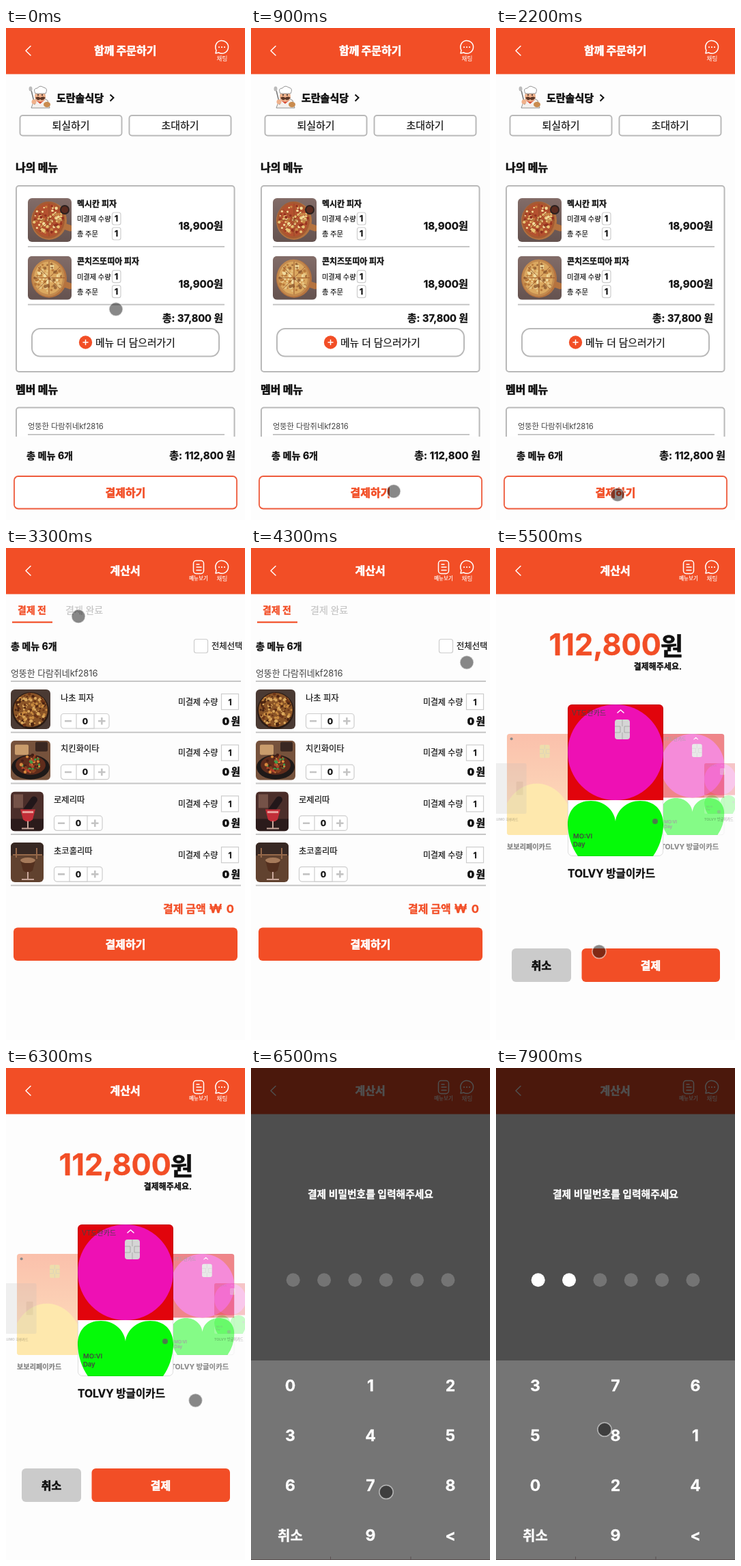
An HTML page for the animation above (8000 ms loop, 350x720 px).

```html
<!DOCTYPE html>
<html lang="ko">
<head>
<meta charset="utf-8">
<title>함께 주문하기</title>
<style>
html, body { margin: 0; width: 100%; height: 100%; overflow: hidden; background: #fdfdfd; }
svg { display: block; width: 350px; height: 720px; }
text { font-family: Inter, "Noto Sans CJK KR", "Noto Sans CJK", sans-serif; font-weight: 400; color: #111; fill: currentColor; stroke-linejoin: round; white-space: pre; }
.d { font-weight: 500; stroke: currentColor; stroke-width: .2; }
.b { font-weight: 700; stroke: currentColor; stroke-width: .3; }
.k { font-weight: 900; stroke: currentColor; stroke-width: .6; }
.m { text-anchor: middle; } .e { text-anchor: end; }
.w { color: #fff; } .o { color: #f24e26; } .g { color: #c4c4c4; } .n { color: #444; }
.line { fill: none; stroke: #c6c6c6; stroke-width: 2; }
.box { fill: #fff; stroke: #b9b9b9; stroke-width: 2; }
.thin { fill: #fff; stroke: #cdcdcd; stroke-width: 1.2; }
.icon { fill: none; stroke: #fff; stroke-width: 1.5; stroke-linecap: round; stroke-linejoin: round; }

/* Everything shares one 8 s clock */
.bill, .checked, .cards, .pin, .one, .two, .cursor { animation: 8s step-end -10ms infinite; }
.bill { animation-name: bill; } .checked { animation-name: checked; }
.cards { animation-name: cards; } .pin { animation-name: pin; }
.one { animation-name: one; } .two { animation-name: two; }
@keyframes bill { 0% { opacity: 0 } 32.5%, to { opacity: 1 } }
@keyframes checked { 0% { opacity: 0 } 58.75%, to { opacity: 1 } }
@keyframes cards { 0% { opacity: 0 } 66.25%, to { opacity: 1 } }
@keyframes pin { 0% { opacity: 0 } 81.25%, to { opacity: 1 } }
@keyframes one { 0% { opacity: 0 } 92.5%, to { opacity: 1 } }
@keyframes two { 0% { opacity: 0 } 97.5%, to { opacity: 1 } }

.cursor { animation-name: cursor; fill: #0007; stroke: #fff8; stroke-width: 1.5; }
@keyframes cursor {
  0% { translate: 161px 411.5px; animation-timing-function: steps(2) }
  2.5% { translate: 70px 300px }
  3.75% { translate: 26px 205px; animation-timing-function: steps(3) }
  7.5% { translate: 332px 27px; animation-timing-function: steps(2) }
  10% { translate: 300px 430px }
  11.25% { translate: 209px 678px }
  12.5% { translate: 187px 650px }
  13.75% { translate: 196px 622px }
  25% { translate: 185px 640px }
  26.25% { translate: 171px 675px }
  27.5%, 32.5% { translate: 178px 683px; animation-timing-function: step-end }
  33.75% { translate: 180px 640px; animation-timing-function: steps(3) }
  37.5% { translate: 220px 330px; animation-timing-function: steps(3) }
  41.25% { translate: 106px 100px }
  42.5% { translate: 94px 102px }
  43.75% { translate: 115px 95px }
  45% { translate: 134px 92px }
  47.5% { translate: 100px 110px }
  48.75% { translate: 55px 160px }
  50% { translate: 16px 270px }
  51.25% { translate: 150px 486px }
  52.5% { translate: 336px 380px }
  53.75% { translate: 316px 167.5px; animation-timing-function: steps(2) }
  56.25% { translate: 287px 146px }
  57.5% { translate: 285px 144px; animation-timing-function: steps(4) }
  62.5% { translate: 230px 400px; animation-timing-function: steps(2) }
  65% { translate: 165px 580px; animation-timing-function: steps(3) }
  68.75% { translate: 151px 590.5px; animation-timing-function: steps(2) }
  71.25% { translate: 175px 300px }
  72.5% { translate: 170px 137px; animation-timing-function: steps(2) }
  75% { translate: 24px 345px; animation-timing-function: steps(2) }
  77.5% { translate: 340px 345px; animation-timing-function: steps(2) }
  80% { translate: 215px 628px }
  81.25% { translate: 198px 620.5px; animation-timing-function: steps(6) }
  88.75% { translate: 180px 706px }
  91.25% { translate: 178px 692px }
  92.5% { translate: 175px 684px; animation-timing-function: steps(3) }
  96.25% { translate: 170px 550px }
  97.5% { translate: 165px 537px }
  98.75%, to { translate: 159px 529px }
}
</style>
</head>
<body>
<svg id="stage" viewBox="0 0 350 720"></svg>
<script>
const ORANGE = '#f24e26';
const text = (x, y, size, str, cls = '') => `<text x="${x}" y="${y}" font-size="${size}" class="${cls}">${str}</text>`;
const rect = (x, y, w, h, r, attrs) => `<rect x="${x}" y="${y}" width="${w}" height="${h}" rx="${r}" ${attrs}/>`;
const disc = (x, y, r, fill) => `<circle cx="${x}" cy="${y}" r="${r}" fill="${fill}"/>`;
const oval = (x, y, rx, ry, fill) => `<ellipse cx="${x}" cy="${y}" rx="${rx}" ry="${ry}" fill="${fill}"/>`;
const path = (d, attrs) => `<path d="${d}" ${attrs}/>`;
const group = (cls, body) => `<g class="${cls}">${body}</g>`;
const at = (x, y, body, scale = 1, attrs = '') => `<g transform="translate(${x} ${y}) scale(${scale})" ${attrs}>${body}</g>`;
const rule = (x1, x2, y) => path(`M${x1} ${y}H${x2}`, 'class="line"');

// Seeded scatter of toppings inside a disc
function specks(n, seed, cx, cy, r, colors) {
  const rand = () => (seed = (seed * 16807) % 2147483647) / 2147483647;
  let out = '';
  for (let i = 0; i < n; i++) {
    const a = rand() * 6.283, d = Math.sqrt(rand()) * r;
    out += disc((cx + d * Math.cos(a)).toFixed(1), (cy + d * Math.sin(a)).toFixed(1), (1 + rand() * 1.5).toFixed(1), colors[i % colors.length]);
  }
  return out;
}

const photo = (x, y, w, h, body) => at(x, y, body, 1, `clip-path="url(#clip${w})"`);
const slices = path('M31 8V56M8 32H54M15 16L47 48M47 16L15 48', 'stroke="#8d4a24" stroke-width=".8"');
const pizza = (crust, sauce, colors, seed) => rect(0, 0, 64, 64, 0, 'fill="url(#table)"')
  + path('M44 38L62 44', 'stroke="#b5733f" stroke-width="9" stroke-linecap="round"')
  + oval(31, 33, 26, 28, '#b5733f') + oval(30, 32, 24, 27, crust) + oval(30, 32, 21, 24, sauce)
  + specks(90, seed, 30, 32, 21, colors) + slices;
const mexican = pizza('#a65a32', '#b4512f', ['#f3dd9a', '#93301f', '#e8c476', '#c98745'], 11)
  + disc(54, 17, 7, '#2c211f') + disc(54, 17, 5, '#5a2b20');
const corn = pizza('#c38a4e', '#dba860', ['#f1dca0', '#b97a3c', '#e6c481', '#9c6a3a'], 23);
const nacho = rect(0, 0, 58, 58, 0, 'fill="#4a3a33"') + disc(29, 31, 27, '#2b1b14') + disc(29, 30, 25, '#8a5427')
  + specks(130, 7, 29, 30, 24, ['#c98b40', '#4b2412', '#dba85c', '#6e3517']);
const fajita = rect(0, 0, 58, 58, 0, 'fill="#76523c"') + rect(6, 6, 20, 15, 2, 'fill="#c99c6c"') + rect(36, 2, 18, 14, 2, 'fill="#3a2721"')
  + oval(29, 39, 28, 18, '#1e1918') + oval(29, 36, 22, 14, '#5f2c1c')
  + specks(60, 19, 29, 35, 14, ['#b2432a', '#3f9a49', '#82401f', '#d9883c', '#431f16']);
const glass = color => path('M14 26H36L32 41Q25 47 18 41Z', `fill="${color}"`)
  + path('M25 43V53M16 54H34', 'stroke="#c9a79b" stroke-width="2"');
const rose = rect(0, 0, 48, 58, 0, 'fill="#4b2e2a"') + rect(0, 40, 48, 18, 0, 'fill="#2b1b1b"')
  + rect(4, 4, 14, 20, 0, 'fill="#755248"') + path('M22 29L34 12', 'stroke="#22171a" stroke-width="10" stroke-linecap="round"')
  + glass('#c22e38') + path('M17 30H33', 'stroke="#e8a09b" stroke-width="3"');
const choco = rect(0, 0, 48, 58, 0, 'fill="#61422f"') + rect(0, 0, 48, 19, 0, 'fill="#372823"')
  + path('M3 18H46M8 8V22M38 8V24', 'stroke="#96694a" stroke-width="2"')
  + glass('#54301f') + oval(25, 26, 11, 4, '#a67a5a');

const chef = path('M41 106Q50 98 61 106L64 117H37Z', 'fill="#f4f1ee" stroke="#777" stroke-width=".8"')
  + path('M44 106L50 111L57 105Z', 'fill="#d84a35"') + disc(50, 100, 8, '#efb18b')
  + path('M43 102Q47 99 50 102Q54 99 58 102Q53 108 50 104Q47 108 43 102Z', 'fill="#5d3828"')
  + path('M43 96Q39 88 46 88Q50 83 55 87Q62 88 58 96Z', 'fill="#fff" stroke="#888" stroke-width=".9"')
  + disc(47, 98, 1, '#222') + disc(53, 98, 1, '#222')
  + path('M37 91L42 112', 'stroke="#777" stroke-width="1.5"') + oval(36, 89, 2.5, 3.5, '#bbb')
  + disc(41, 108, 3.5, '#efb18b') + oval(60, 112, 5, 4, '#c98b4e');

const bubble = path('M308 32.5A9.4 9.4 0 1 1 311.5 36L307 37Z', 'class="icon"')
  + [312, 316, 320].map(x => disc(x, 28, 1.1, '#fff')).join('') + text(316.5, 48, 8.6, '채팅', 'w m');
const header = title => rect(0, 0, 350, 67.5, 0, `fill="${ORANGE}"`) + path('M36 26.5L29 33.3L36 40', 'class="icon"')
  + text(174.7, 39, 16, title, 'w k m') + bubble;
const menuIcon = rect(274.5, 18.5, 15, 19, 4, 'class="icon"') + path('M279 24H283M279 28H286M279 32.5H286', 'class="icon"')
  + text(282, 47, 7.5, '메뉴보기', 'w d m');
const paper = rect(0, 0, 350, 720, 0, 'fill="#fdfdfd"');

const count = y => rect(155.5, y, 12.5, 18, 3, 'class="thin"') + text(161.7, y + 13.3, 12, '1', 'b m');
const dish = (dy, pic, name) => at(0, dy, photo(32, 249, 64, 64, pic) + text(104, 261.5, 12, name, 'b')
  + text(104, 283, 10.2, '미결제 수량', 'd') + count(270) + text(104, 305, 10.2, '총 주문', 'd') + count(292)
  + text(318, 295, 15.2, '18,900원', 'b e') + rule(32, 320, 320));
const user = '엉뚱한 다람쥐네kf2816';

const order = paper + header('함께 주문하기') + chef + text(74, 108, 15, '도란솔식당', 'k')
  + path('M152.5 97.5L157.5 102L152.5 107', 'fill="none" stroke="#111" stroke-width="2"')
  + rect(20.5, 128, 149, 29.5, 4, 'class="box"') + text(95, 148, 15, '퇴실하기', 'd m')
  + rect(180.5, 128, 149, 29.5, 4, 'class="box"') + text(255, 148, 15, '초대하기', 'd m')
  + text(14, 210, 16, '나의 메뉴', 'k') + rect(15, 231, 319.5, 272, 4, 'class="box"')
  + dish(0, mexican, '멕시칸 피자') + dish(84.7, corn, '콘치즈또띠아 피자')
  + text(318, 430, 14.7, '총: 37,800 원', 'b e')
  + rect(38, 440, 274, 40.5, 12, 'class="box"') + disc(116.5, 460, 9.7, ORANGE)
  + path('M113 460H120M116.5 456.5V463.5', 'class="icon"') + text(131, 465.5, 14.8, '메뉴 더 담으러가기', 'd')
  + text(14, 535, 16, '멤버 메뉴', 'k') + rect(15, 555.5, 319.5, 100, 4, 'class="box"')
  + text(32, 587, 11.2, user, 'n') + rule(32, 320, 595) + rect(0, 598, 350, 122, 0, 'fill="#fdfdfd"')
  + text(30, 630.5, 14.2, '총 메뉴 6개', 'b') + text(336, 630.5, 15, '총: 112,800 원', 'b e')
  + rect(12, 656, 326, 47.5, 6, 'fill="#fff" stroke="#ee5b3c" stroke-width="1.8"') + text(175, 686, 16, '결제하기', 'o k m');

const rows = [[nacho, 58, '나초 피자', '22,900'], [fajita, 58, '치킨화이타', '25,900'], [rose, 48, '로제리따', '12,900'], [choco, 48, '초코홀리따', '13,300']];
const rowY = i => 195 + i * 74.7;
const stepper = rect(.5, 47.5, 70.5, 21.5, 4, 'class="thin"') + rect(23, 47.5, 26, 21.5, 0, 'class="thin"')
  + path('M6 58.3H16M55 58.3H65.5M60.3 53V63.5', 'stroke="#c4c4c4" stroke-width="2.6"') + text(36, 62.7, 12.3, '0', 'b m');
const row = ([pic, w, name], i) => at(0, rowY(i), photo(7, 12, w, 58, pic)
  + at(w + 22, 0, text(0, 28.5, 12.3, name, 'd') + stepper)
  + text(252, 34.5, 12, '미결제 수량', 'd') + rect(315.5, 18.5, 25, 23, 0, 'class="thin"') + text(328, 34.5, 12, '1', 'b m')
  + text(343, 63.5, 14.3, '0 원', 'k e') + rule(7, 344, 74.7));
const chosen = ([, w, , price], i) => at(0, rowY(i), rect(w + 46, 49, 24, 18, 0, 'fill="#fff"') + text(w + 58, 62.7, 12.3, '1', 'b m')
  + rect(265, 50, 79, 18, 0, 'fill="#fdfdfd"') + text(343, 63.5, 14.3, price + ' 원', 'k e'));

const bill = paper + header('계산서') + menuIcon + text(17, 96, 14, '결제 전', 'o b') + rect(9, 107.5, 59, 2.2, 0, `fill="${ORANGE}"`)
  + text(87, 96, 14, '결제 완료', 'g d') + text(7, 148.5, 14.1, '총 메뉴 6개', 'b')
  + rect(275.5, 133.5, 20, 20, 3, 'class="thin"') + text(301, 148, 12.3, '전체선택', 'd')
  + text(7, 188, 12.9, user, 'n') + rule(7, 344, 195) + rows.map(row).join('')
  + text(230, 534, 16, '결제 금액', 'o b') + text(307, 534, 18, '₩', 'o b m') + text(334, 534, 16.5, '0', 'o b e')
  + rect(11, 555.5, 328, 48.5, 6, `fill="${ORANGE}"`) + text(175, 586, 16, '결제하기', 'w k m')
  + group('checked', rect(275, 133, 21, 21, 3, `fill="${ORANGE}"`) + path('M280 143.5L284 148L291.5 139', 'class="icon"')
    + rows.map(chosen).join('') + rect(150, 514, 190, 28, 0, 'fill="#fdfdfd"') + text(334, 534, 16, '결제 금액 ₩ 112,800', 'o b e'));

const chip = (x, y, fill) => rect(x, y, 22, 29, 4, `fill="${fill}"`)
  + path(`M${x} ${y + 10}h8v9h-8M${x + 22} ${y + 10}h-8v9h8M${x + 11} ${y}v10M${x + 11} ${y + 19}v10`, 'fill="none" stroke="#999" stroke-width=".7"');
const smile = `<g clip-path="url(#card)">${rect(0, 0, 140, 222, 0, 'fill="#fff"')}${rect(0, 0, 140, 140, 0, 'fill="#e1040c"')}`
  + disc(70, 70, 70, '#ee10b4')
  + path('M0 176C0 154 13 141 34 141C53 141 68 154 70 171C72 154 87 141 106 141C127 141 140 154 140 176Q139 202 125 222H15Q1 202 0 176Z', 'fill="#05fa08"')
  + '</g>' + rect(.5, .5, 139, 221, 6, 'fill="none" stroke="#0002"')
  + text(6, 15.5, 10, 'VT도란카드', 'n') + path('M73 12L77.5 8L82 12', 'class="icon"') + chip(69, 22, '#d5d5d5')
  + disc(128, 171, 4, '#4b7b4b') + text(8, 196, 9.5, 'MO:VI', 'n d') + text(8, 207.5, 9.5, 'Day', 'n d')
  + text(0, 253, 15.6, 'TOLVY 방글이카드', 'b');
const peach = `<g clip-path="url(#card)">${rect(0, 0, 140, 222, 0, 'fill="url(#peach)"')}${oval(66, 215, 82, 106, '#ffd566')}</g>`
  + disc(10, 11, 3, '#222') + chip(72, 24, '#e2c164') + text(0, 253, 15.2, '보보리페이카드', 'b');
const plain = rect(0, 0, 140, 222, 6, 'fill="#bbb"') + rect(95, 80, 30, 60, 4, 'fill="#888"') + text(0, 253, 15, 'LUMO 하루카드', 'b');

const pay = paper + header('계산서') + menuIcon
  + text(242, 157, 43.3, '112,800', 'o b e') + text(241, 157, 36, '원', 'k') + text(272, 178, 12, '결제해주세요.', 'b e')
  + at(16, 272, peach, .667, 'opacity=".52"') + at(241, 272, smile, .667, 'opacity=".48"')
  + at(-2, 315, plain, .333, 'opacity=".2"') + at(305, 315, smile, .333, 'opacity=".22"') + at(105, 229, smile)
  + rect(23, 586, 87, 49, 6, 'fill="#cbcbcb"') + text(66.5, 616.5, 16, '취소', 'k m')
  + rect(125.5, 586, 202.5, 49, 6, `fill="${ORANGE}"`) + text(226.5, 616.5, 16, '결제', 'w k m');

const keypad = keys => rect(0, 428, 350, 292, 0, 'fill="#757575"')
  + path('M0 719.5H350M116.5 715V720M234 715V720', 'stroke="#5b5051"')
  + [...keys].map((key, i) => {
    const x = [57.5, 175, 292][i % 3], y = 472.5 + 73.2 * (i / 3 | 0);
    return key === 'x' ? text(x, y - .5, 20, '취소', 'w b m') : text(x, y, 23, key === 'l' ? '&lt;' : key, 'w b m');
  }).join('');
const dot = (i, fill) => disc(61.7 + 45.35 * i, 310.3, 10, fill);

const pin = paper + header('계산서') + menuIcon + rect(0, 0, 350, 720, 0, 'fill="#000" opacity=".69"')
  + text(175, 189.5, 14.8, '결제 비밀번호를 입력해주세요', 'w b m')
  + [0, 1, 2, 3, 4, 5].map(i => dot(i, '#747474')).join('') + keypad('012345678x9l')
  + group('one', dot(0, '#fff') + keypad('740286315x9l')) + group('two', dot(1, '#fff') + keypad('376581024x9l'));

const clip = (id, w, h) => `<clipPath id="${id}">${rect(0, 0, w, h, 6, '')}</clipPath>`;
const fade = (id, a, b) => `<linearGradient id="${id}" x2="0" y2="1"><stop stop-color="${a}"/><stop offset="1" stop-color="${b}"/></linearGradient>`;
const defs = `<defs>${clip('clip64', 64, 64)}${clip('clip58', 58, 58)}${clip('clip48', 48, 58)}${clip('card', 140, 222)}`
  + fade('table', '#826c68', '#64524f') + fade('peach', '#f98a62', '#ffc987') + '</defs>';

document.getElementById('stage').innerHTML = defs + order + group('bill', bill) + group('cards', pay) + group('pin', pin)
  + '<circle class="cursor" r="10.1"/>';
</script>
</body>
</html>
```
